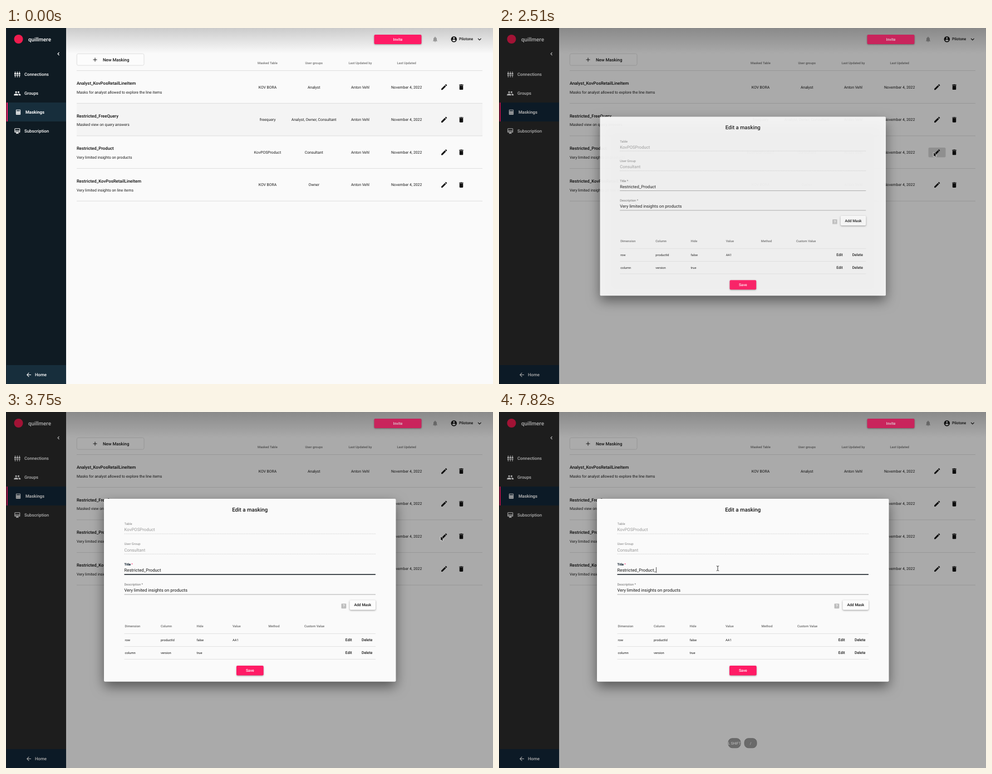
An HTML page with a canvas that plays this animation: 875 by 640 pixels, repeating every 8 s.

```html
<!DOCTYPE html>
<html lang="en">
<head>
<meta charset="utf-8">
<title>Maskings</title>
<style>
html, body { margin: 0; width: 875px; height: 640px; overflow: hidden; background: #fafafa; }
canvas { display: block; }
</style>
</head>
<body>
<canvas id="stage" width="875" height="640"></canvas>
<script>
const ctx = document.getElementById('stage').getContext('2d');
const LOOP = 8000;
const PINK = '#ff1b65';
const UI = 'Roboto, sans-serif';
const DESK = '"Open Sans", "Noto Sans", sans-serif';

const icons = {
  edit: 'M3 17.25V21h3.75L17.81 9.94l-3.75-3.75L3 17.25zM20.71 7.04a1 1 0 0 0 0-1.41l-2.34-2.34a1 1 0 0 0-1.41 0l-1.83 1.83 3.75 3.75 1.83-1.83z',
  trash: 'M6 19c0 1.1.9 2 2 2h8c1.1 0 2-.9 2-2V7H6v12zM19 4h-3.5l-1-1h-5l-1 1H5v2h14V4z',
  bell: 'M12 22c1.1 0 2-.9 2-2h-4c0 1.1.9 2 2 2zm6-6v-5c0-3.07-1.64-5.64-4.5-6.32V4a1.5 1.5 0 0 0-3 0v.68C7.63 5.36 6 7.92 6 11v5l-2 2v1h16v-1l-2-2z',
  account: 'M12 2a10 10 0 1 0 0 20 10 10 0 0 0 0-20zm0 3a3 3 0 1 1 0 6 3 3 0 0 1 0-6zm0 14.2a7.2 7.2 0 0 1-6-3.22c.03-1.99 4-3.08 6-3.08s5.97 1.09 6 3.08a7.2 7.2 0 0 1-6 3.22z',
  people: 'M16 11a3 3 0 1 0 0-6 3 3 0 0 0 0 6zm-8 0a3 3 0 1 0 0-6 3 3 0 0 0 0 6zm0 2c-2.33 0-7 1.17-7 3.5V19h14v-2.5C15 14.17 10.33 13 8 13zm8 0c-.29 0-.62.02-.97.05A4.2 4.2 0 0 1 17 16.5V19h6v-2.5c0-2.33-4.67-3.5-7-3.5z',
  card: 'M20 2H4a2 2 0 0 0-2 2v11a2 2 0 0 0 2 2h4v5l4-2 4 2v-5h4a2 2 0 0 0 2-2V4a2 2 0 0 0-2-2zm0 13H4v-2h16v2zm0-5H4V4h16v6z',
  calc: 'M5 2h14a2 2 0 0 1 2 2v16a2 2 0 0 1-2 2H5a2 2 0 0 1-2-2V4a2 2 0 0 1 2-2zM5 4v4h14V4zM6 10v2h2v-2zM11 10v2h2v-2zM16 10v2h2v-2zM6 14v2h2v-2zM11 14v2h2v-2zM16 14v2h2v-2zM6 18v2h2v-2zM11 18v2h2v-2zM16 18v2h2v-2z',
  plugs: 'M3 1h2v5h2v6H1V6h2zM11 1h2v5h2v6H9V6h2zM19 1h2v5h2v6h-6V6h2zM1 14h6v3H5v6H3v-6H1zM9 14h6v3h-2v6h-2v-6H9zM17 14h6v3h-2v6h-2v-6h-2z',
  back: 'M20 11H7.83l5.59-5.59L12 4l-8 8 8 8 1.41-1.41L7.83 13H20v-2z',
  star: 'M22 9.24l-7.19-.62L12 2 9.19 8.63 2 9.24l5.46 4.73L5.82 21 12 17.27 18.18 21l-1.63-7.03zM12 15.4l-3.76 2.27 1-4.28-3.32-2.88 4.38-.38L12 6.1l1.71 4.04 4.38.38-3.32 2.88 1 4.28z',
  folder: 'M10 4H4a2 2 0 0 0-2 2v12a2 2 0 0 0 2 2h16a2 2 0 0 0 2-2V8a2 2 0 0 0-2-2h-8z',
  home: 'M10 20v-6h4v6h5v-8h3L12 3 2 12h3v8z'
};
for (const k in icons) icons[k] = new Path2D(icons[k]);

const clamp = p => Math.min(1, Math.max(0, p));
const smooth = p => p * p * (3 - 2 * p);
const span = (t, a, b) => clamp((t - a) / (b - a));
const easeOut = (p, k) => 1 - Math.pow(1 - p, k);

function icon(name, x, y, size, color) {
  ctx.save();
  ctx.translate(x - size / 2, y - size / 2);
  ctx.scale(size / 24, size / 24);
  ctx.fillStyle = color;
  ctx.fill(icons[name], 'evenodd');
  ctx.restore();
}

// y is the middle of the capital letters
function text(str, x, y, size, color, weight = 400, align = 'left', family = UI) {
  ctx.font = `${weight} ${size}px ${family}`;
  ctx.textAlign = align;
  ctx.fillStyle = color;
  ctx.fillText(str, x, y + size * 0.356);
}
const mid = (str, x, y, size, color, weight) => text(str, x, y, size, color, weight, 'center');

function rect(x, y, x2, y2, color) {
  ctx.fillStyle = color;
  ctx.fillRect(x, y, x2 - x, y2 - y);
}

function box(x, y, x2, y2, r, fill, stroke) {
  ctx.beginPath();
  ctx.roundRect(x, y, x2 - x, y2 - y, r);
  if (fill) { ctx.fillStyle = fill; ctx.fill(); }
  if (stroke) { ctx.strokeStyle = stroke; ctx.lineWidth = 0.8; ctx.stroke(); }
}

function raised(blur, dy, color, draw) {
  ctx.save();
  ctx.shadowColor = color;
  ctx.shadowBlur = blur;
  ctx.shadowOffsetY = dy;
  draw();
  ctx.restore();
}

function line(points, color, width = 1, dash = []) {
  ctx.beginPath();
  points.forEach(([x, y]) => ctx.lineTo(x, y));
  ctx.strokeStyle = color;
  ctx.lineWidth = width;
  ctx.setLineDash(dash);
  ctx.stroke();
  ctx.setLineDash([]);
}

function dot(x, y, r, color) {
  ctx.beginPath();
  ctx.arc(x, y, r, 0, 7);
  ctx.fillStyle = color;
  ctx.fill();
}

function fade(x, y, x2, y2, from, to) {
  const g = ctx.createLinearGradient(x, y, x2, y2);
  g.addColorStop(0, from);
  g.addColorStop(1, to);
  return g;
}

const rows = [
  ['Analyst_KovPosRetailLineItem', 'Masks for analyst allowed to explore the line items', 'KOV BORA', 'Analyst'],
  ['Restricted_FreeQuery', 'Masked view on query answers', 'freequery', 'Analyst, Owner, Consultant'],
  ['Restricted_Product', 'Very limited insights on products', 'KovPOSProduct', 'Consultant'],
  ['Restricted_KovPosRetailLineItem', 'Very limited insights on line items', 'KOV BORA', 'Owner']
];

function sidebar(dim) {
  const lit = dim ? '#122638' : '#172e3c';
  const ink = '#ffffff';
  rect(0, 0, 108, 640, dim ? '#2b2b2b' : '#0f1b23');
  rect(1, 134, 108, 168, lit);
  rect(1, 134, 3, 168, PINK);
  rect(1, 606, 108, 640, lit);
  rect(0, 0, 1, 640, '#1c2630');
  dot(22.5, 20, 8, '#ee1c4e');
  text('quillmere', 40, 20.5, 9.8, ink, 500);
  line([[95.5, 44], [93, 46.5], [95.5, 49]], ink, 1.1);
  icon('plugs', 20.3, 83.5, 11.5, ink);
  icon('people', 20.3, 117.5, 13, ink);
  icon('calc', 22, 151.3, 11, ink);
  icon('card', 20.3, 185.5, 12, ink);
  text('Connections', 33, 83.7, 7.8, ink, 500);
  text('Groups', 33, 117.7, 7.8, ink, 500);
  text('Maskings', 35, 151.6, 7.8, ink, 700);
  text('Subscription', 33, 185.4, 7.8, ink, 500);
  icon('back', 41, 623.5, 12, ink);
  text('Home', 52, 623.7, 7.8, ink, 500);
}

function ripple(t) {
  if (t < 2280 || t >= 2740) return;
  ctx.save();
  ctx.beginPath();
  ctx.roundRect(771.5, 215, 31, 17.5, 2);
  ctx.clip();
  const gone = span(t, 2570, 2620);
  rect(770, 214, 804, 234, `rgba(0,0,0,${0.05 * (1 - gone)})`);
  dot(781, 227, 4 + 24 * span(t, 2260, 2450), `rgba(0,0,0,${0.11 - 0.09 * gone})`);
  ctx.restore();
}

function page(t, dim) {
  rect(0, 0, 875, 640, '#fafafa');
  rect(108, 0, 875, 46, fade(0, 0, 0, 46, '#cbcbcb', '#fafafa'));
  box(127.3, 46.3, 248, 67.2, 2.5, '#fcfcfc', '#d9d9d9');
  line([[156.5, 57], [163.5, 57]], '#222');
  line([[160, 53.5], [160, 60.5]], '#222');
  text('New Masking', 174, 56.8, 7.8, '#161616', 500);

  ['Masked Table', 'User groups', 'Last Updated by', 'Last Updated'].forEach((h, i) =>
    mid(h, 470 + i * 83.2, 63.3, 5.8, '#727272', 500));
  const hover = dim ? -1 : t < 2280 ? 1 : 2;
  rows.forEach((r, i) => {
    const y = 76.7 + i * 58.6;
    if (i === hover) rect(127, y, 856, y + 58.6, '#f4f4f4');
    text(r[0], 127, y + 22.5, 7.8, '#0d0d0d', 500);
    text(r[1], 127, y + 38.7, 6.84, '#1b1b1b');
    [r[2], r[3], 'Anton Vehl', 'November 4, 2022'].forEach((c, k) =>
      mid(c, 470 + k * 83.2, y + 29.4, 6.84, '#1b1b1b'));
  });
  for (let i = 0; i < 5; i++) rect(127, 76.3 + i * 58.6, 856, 77.1 + i * 58.6, '#d8d8d8');
  ripple(t);
  for (let i = 0; i < 4; i++) {
    icon('edit', 787.2, 106.2 + i * 58.6, 13.6, '#111');
    icon('trash', 818, 106.2 + i * 58.6, 13, '#111');
  }
  icon('bell', 771, 20.3, 12, '#979797');
  icon('account', 804.8, 20.2, 12.6, '#111');
  text('Pilotone', 814, 20, 6.84, '#111', 500);
  line([[848, 18.8], [850.8, 21.6], [853.6, 18.8]], '#111', 1.1);
  sidebar(dim);
  if (dim) rect(0, 0, 875, 640, `rgba(0,0,0,${0.32 * dim})`);
  raised(2.5, 1, 'rgba(0,0,0,.35)', () =>
    box(661.5, 12, 746.5, 29, 2, dim ? '#c9245c' : PINK));
  mid('Invite', 704, 20.5, 6.84, dim ? '#e0d4d8' : '#fff', 500);
}

function caretOn(t) {
  return t < 3750 || (t >= 4510 && t < 5600) || (t >= 6110 && t < 7300) || t >= 7760;
}

function field(label, value, y, ink, star, starInk) {
  text(label, 212.5, y, 5.86, ink === '#999' ? '#858585' : '#6c6c6c');
  if (star) {
    const w = ctx.measureText(label + ' ').width;
    text('*', 212.5 + w, y, 5.86, starInk || '#6c6c6c');
  }
  text(value, 212.5, y + 10.6, 7.8, ink);
}

function dialog(t) {
  const p = easeOut(span(t, 2417, 2567), 2.75);
  const s = 0.7 + 0.3 * p;
  const focus = t >= 2600;
  ctx.save();
  ctx.globalAlpha = p;
  ctx.translate(438.3, 320.3);
  ctx.scale(s, s);
  ctx.translate(-438.3, -320.3);
  raised(22, 9, 'rgba(0,0,0,.5)', () => box(176, 156, 700.5, 484.8, 2, '#fafafa'));
  mid('Edit a masking', 438.2, 175.6, 9.76, '#161616', 500);

  field('Table', 'KovPOSProduct', 201, '#999');
  field('User Group', 'Consultant', 237.4, '#999');
  for (const y of [219, 255.3]) line([[212.5, y], [664, y]], '#bdbdbd', 0.6, [1.6, 1]);

  const title = 'Restricted_Product' + (t >= 7820 ? '_' : '');
  field('Title', title, 273.7, '#161616', true, focus && PINK);
  if (focus) text('Title', 212.5, 273.7, 5.86, '#0d2233', 500);
  rect(212.5, 291.7, 664, 292.4, '#8c8c8c');
  if (focus) {
    const half = 225.7 * (0.5 + 0.5 * easeOut(span(t, 2580, 2860), 3.64));
    rect(438.2 - half, 291.4, 438.2 + half, 292.8, '#10181e');
    ctx.font = `400 7.8px ${UI}`;
    const x = 212.5 + ctx.measureText(title).width;
    if (caretOn(t)) rect(x, 279, x + 0.7, 289, '#111');
  }
  field('Description', 'Very limited insights on products', 310, '#161616', true);
  rect(212.5, 327.7, 664, 328.4, '#8c8c8c');

  box(602.5, 344.5, 611.3, 353.3, 1, '#bcbcbc');
  mid('?', 606.9, 349, 7, '#fafafa', 700);
  raised(3, 1, 'rgba(0,0,0,.4)', () => box(617.5, 338.2, 664, 355.8, 2, '#fcfcfc'));
  mid('Add Mask', 640.8, 347, 6.84, '#161616', 500);

  const cells = [
    ['Dimension', 'Column', 'Hide', 'Value', 'Method', 'Custom Value'],
    ['row', 'productId', 'false', 'AA1'],
    ['column', 'version', 'true']
  ];
  cells.forEach((c, i) => {
    const y = i ? 386.4 + i * 23.3 : 384.5;
    c.forEach((v, k) => text(v, 213.5 + k * 64.5, y, 5.8, i ? '#1b1b1b' : '#6a6a6a', i ? 400 : 500));
    if (i) {
      mid('Edit', 615.7, y - 0.4, 6.84, '#161616', 500);
      mid('Delete', 648.7, y - 0.4, 6.84, '#161616', 500);
    }
    rect(212.5, 398 + i * 23.1, 664, 398.7 + i * 23.1, '#d8d8d8');
  });
  raised(2.5, 1, 'rgba(0,0,0,.35)', () => box(414, 456, 462.7, 473.5, 2, PINK));
  mid('Save', 438.3, 464.6, 6.84, '#fff', 500);
  ctx.restore();
}

function desk(str, x, y, color, align, size = 6.5, weight) {
  text(str, x, y, size, color, weight, align, DESK);
}

function drawApp() {
  rect(0, 0, 761, 607, '#2a2a2a');
  desk('Karostift Draw', 11, -1, '#eee', 'left', 7, 700);
  rect(734, 0, 738, 1, '#ddd');
  rect(750, 0, 754, 1, '#ddd');
  rect(0, 9, 48, 10, '#383838');
  for (const x of [13, 25]) {
    line([[x - 4, 36.5], [x + 4, 36.5]], '#ccc', 1.2);
    line([[x - 2, 33], [x - 2, 40]], '#ccc');
    line([[x + 2, 33], [x + 2, 40]], '#ccc');
  }
  line([[2, 36], [3.5, 37.5], [5, 36]], '#ccc');
  rect(38, 33, 46, 40, '#3a3a3a');
  desk('12   13   14', 9, 54, '#777', 'left', 4.5);
  rect(1, 69, 48, 568.5, '#fff');
  rect(1, 92.5, 48, 93.3, '#c4c4c4');
  rect(1, 544.8, 48, 545.6, '#c4c4c4');
  text('cted d', -1, 167, 20.5, '#111', 400, 'left', '"Liberation Sans", Arial, sans-serif');
  const wave = [];
  for (let x = 0; x <= 48; x += 1.5) wave.push([x, 175 + (x / 1.5 % 2 ? 0.8 : -0.8)]);
  line(wave, '#d33', 0.8);
  for (let i = 0; i < 4; i++) rect(11.5, 206 + i * 69.8, 48, 258.5 + i * 69.8, '#ececec');
  for (const y of [140, 467.5]) box(27, y - 2.5, 32, y + 2.5, 0, '#8496a4', '#5c6c78');
  box(1, 579.8, 507, 584, 2, '#9a9a9a');
  rect(189, 600, 192, 602, '#d33');
  line([[407, 605], [409, 602], [413, 601]], '#c9b62e');
  desk('0,73 / 2,00', 199, 602.3, '#bbb', 'left', 5.8);
  desk('24,02 x 13,75', 416, 602.3, '#bbb', 'left', 5.8);
  desk('1:1', 626, 602.3, '#bbb', 'left', 5.6);
  rect(638, 600, 642, 605, '#eee');
  rect(639, 601, 641.5, 603.5, '#d33');
  line([[682, 602.3], [727, 602.3]], '#aaa', 0.8);
  dot(704, 602.3, 2, '#eee');
  dot(676, 602.3, 2.5, '#eee');
  dot(733, 602.3, 2.5, '#eee');
  desk('130 %', 742, 602.3, '#bbb', 'left', 5.6);
}

function fileManager() {
  rect(0, 0, 875, 640, fade(700, 0, 875, 640, '#bdbdbd', '#dedede'));
  drawApp();
  raised(12, 3, 'rgba(0,0,0,.6)', () => box(48, 9.5, 867, 575, 3, '#323232'));
  rect(48, 31, 144, 575, '#363636');
  box(48, 9.5, 867, 31, [3, 3, 0, 0], '#2d2d2d');
  rect(285, 10, 591, 31, '#292929');
  rect(144, 31, 867, 44, '#2f2f2f');
  line([[60.5, 17], [57.5, 20], [60.5, 23]], '#ddd', 1.2);
  line([[76, 17], [79, 20], [76, 23]], '#777', 1.2);
  icon('home', 293.5, 20, 8.5, '#aaa');
  desk('Persönlicher Ordner', 300, 20, '#a5a5a5');
  desk('/', 364, 20, '#888');
  desk('Schreibtisch', 371, 20, '#c8c8c8', 'left', 6.2, 700);
  for (let i = -1; i < 2; i++) dot(600.5, 20 + i * 2.8, 0.9, '#ddd');
  ctx.beginPath();
  ctx.arc(620, 19.3, 2.3, 0, 7);
  ctx.strokeStyle = '#ddd';
  ctx.stroke();
  line([[621.6, 21], [624, 23.4]], '#ddd', 1.2);
  for (const x of [773, 776]) for (const y of [18, 21]) rect(x, y, x + 2, y + 2, '#ddd');
  line([[790.5, 19.3], [792.5, 21], [794.5, 19.3]], '#ddd', 1.2);
  for (let i = -1; i < 2; i++) rect(810.5, 19.6 + i * 2.2, 815.5, 20.5 + i * 2.2, '#ddd');
  rect(834, 21.5, 838.5, 22.6, '#ddd');
  line([[853.5, 18], [857.5, 22]], '#eee', 1.2);
  line([[857.5, 18], [853.5, 22]], '#eee', 1.2);

  rect(48, 89, 144, 106, '#b6c1c5');
  const places = ['Zuletzt verwendet', 'Favoriten', 'Persönlicher Ordner', 'Schreibtisch', 'Bilder', 'Dokumente',
    'Downloads', 'Musik', 'Videos', 'Papierkorb', 'quillmere', 'Stowbin', 'ownworkprojects', 'Andere Orte'];
  places.forEach((name, i) => {
    const y = 42.3 + i * 18.4 + (i > 10 ? 4.3 : 0) + (i > 12 ? 4.3 : 0);
    const ink = i === 3 ? '#4b5357' : '#8f8f8f';
    desk(name, 66.5, y, ink, 'left', 6.4);
    if (i === 1) icon('star', 58.7, y, 8.5, ink);
    else if (i === 2) icon('home', 58.7, y, 8.5, ink);
    else if (i === 13) text('+', 58.7, y, 9, ink, 400, 'center');
    else if (i === 0) box(56, y - 2.8, 61.5, y + 2.8, 1, null, ink);
    else icon('folder', 58.7, y, 8, ink);
  });
  rect(48, 237.4, 144, 237.9, '#444');
  line([[128, 227], [130.2, 224.5], [132.4, 227], [128, 227]], '#999', 0.9);
  rect(128, 228.3, 132.4, 229.1, '#999');

  desk('Name', 148, 37.6, '#ccc', 'left', 6.2, 700);
  desk('Größe', 744, 37.6, '#ccc', 'left', 6.2, 700);
  desk('Geändert', 840.5, 37.6, '#ccc', 'right', 6.2, 700);
  line([[731.5, 37], [733.5, 39], [735.5, 37]], '#ccc', 1.2);
  rect(144, 66.5, 867, 88.3, '#b9c4c8');
  const files = [
    ['CreateMasking.gif', '1,3 MB', '07:30 NACHMITTAGS'],
    ['DeleteMasking.gif', '514,5 kB', '07:42 NACHMITTAGS'],
    ['masked-attention-input.png', '205,6 kB', '21. Okt']
  ];
  files.forEach(([name, size, date], i) => {
    const y = 55 + i * 22.3;
    const on = i === 1;
    if (i < 2) {
      rect(152, y - 5.5, 168, y + 5.5, '#eee');
      rect(152, y - 5.5, 154.5, y + 5.5, '#13202a');
    } else {
      rect(152, y - 2.5, 168, y + 2.5, '#e6e6e0');
      rect(154, y - 1, 159, y + 1, '#c8543c');
    }
    desk(name, 171, y, on ? '#4b5357' : '#c0c0c0');
    desk(size, 744, y, on ? '#4b5357' : '#7d7d7d', 'left', 6.2);
    desk(date, 840.5, y, on ? '#4b5357' : '#7d7d7d', 'right', 6);
    icon('star', 855, y, 9.5, on ? '#4b5357' : '#aaa');
    if (i === 0) rect(144, 66, 867, 66.5, '#3c3c3c');
  });
  rect(735, 564, 867, 575, '#1d1d1d');
  desk('»DeleteMasking.gif« ausgewählt (514,5 kB)', 861, 569.6, '#f2f2f2', 'right', 6.4);
}

function mouse(t) {
  if (t < 4510) {
    const p = smooth(span(t, 500, 690));
    return [775 + 6 * p, 222.5 + 1.3 * p];
  }
  if (t < 5350) {
    const p = smooth(span(t, 4510, 5130)), q = 1 - p;
    return [781 - 459.5 * p, q * q * 223.8 + 2 * q * p * 250 + p * p * 327];
  }
  const p = smooth(span(t, 5350, 5820));
  return [321.5 - 40.5 * p + 112 * smooth(span(t, 6110, 6290)), 326.5 - 45.5 * p];
}

function pointer(t) {
  if (t < 500) return;
  const [x, y] = mouse(t);
  ctx.save();
  ctx.translate(x, y);
  ctx.lineJoin = 'round';
  if (t > 5350 && (y < 292 || (y > 313 && y < 326))) {
    const beam = new Path2D('M-2.2-4.2Q0-4.2 0-3Q0-4.2 2.2-4.2M0-3V3.4M-2.2 4.4Q0 4.4 0 3.4Q0 4.4 2.2 4.4');
    ctx.strokeStyle = '#fff';
    ctx.lineWidth = 1.8;
    ctx.stroke(beam);
    ctx.strokeStyle = '#222';
    ctx.lineWidth = 0.9;
    ctx.stroke(beam);
  } else {
    const arrow = new Path2D('M0 0V7.2L1.7 5.7 2.8 8.2 4 7.7 2.9 5.3 5.1 5.1Z');
    ctx.strokeStyle = '#fff';
    ctx.lineWidth = 1.2;
    ctx.stroke(arrow);
    ctx.fillStyle = '#111';
    ctx.fill(arrow);
  }
  ctx.restore();
}

function keycap(label, x) {
  ctx.save();
  box(x - 11, 586.8, x + 11, 603.8, 7, '#6a6a6a', '#5c5c5c');
  ctx.clip();
  mid(label, x, 595.4, 6.4, '#c6c6c6');
  ctx.restore();
}

const bursts = [[500, 690, 4], [2280, 2860, 11], [4510, 5130, 16], [5350, 5820, 12], [6110, 6290, 5]];
function hold(t) {
  for (const [a, b, n] of bursts) {
    if (t < a || t >= b) continue;
    const step = (b - a) / (n - 1);
    const at = k => Math.floor((a + k * step) / 10) * 10;
    let k = n - 1;
    while (at(k) > t) k--;
    return at(k);
  }
  return t;
}

function draw(time) {
  const t = hold(time);
  ctx.textRendering = 'geometricPrecision';
  if (t >= 2570 && t < 2620) fileManager();
  else {
    page(t, span(t, 2417, 2490));
    if (t > 2417) dialog(t);
    if (t >= 7820) {
      keycap('L SHIFT', 423);
      keycap('/', 452);
    } else if (t >= 7760) keycap('L SHIFT', 437.5);
  }
  pointer(t);
}

const start = performance.now();
function tick() {
  draw((performance.now() - start) % LOOP);
  requestAnimationFrame(tick);
}
tick();
</script>
</body>
</html>
```
